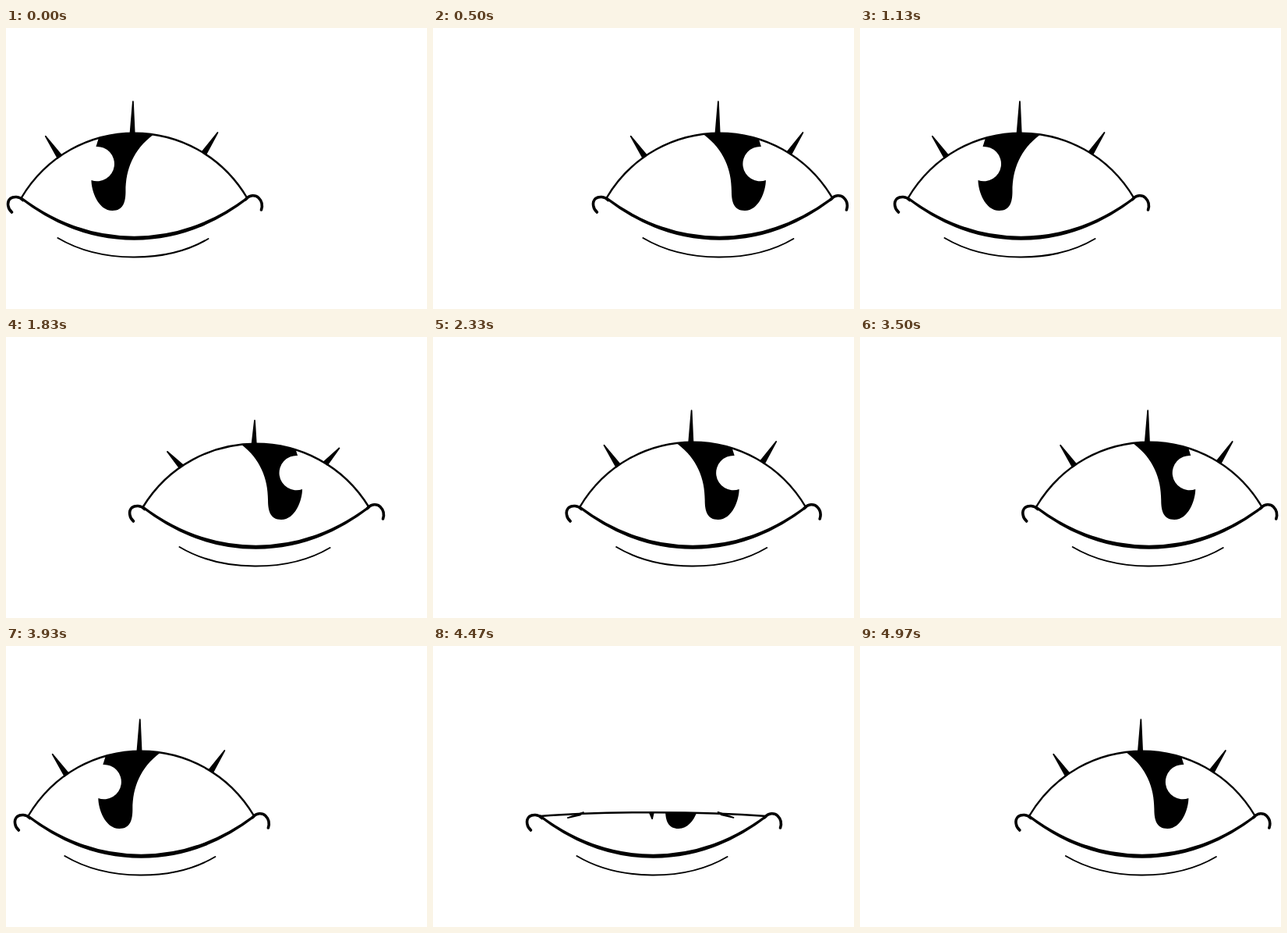
An HTML page that plays this animation: 540x360 px, repeating every 5000 ms.

```html
<!DOCTYPE html>
<html lang="en">
<head>
<meta charset="utf-8">
<title>Glancing eye</title>
<style>
  html, body { margin: 0; width: 100%; height: 100%; overflow: hidden; background: #fff; }
  svg { display: block; width: 540px; height: 360px; }
  .line { fill: none; stroke: #000; stroke-linecap: round; stroke-linejoin: round; }
</style>
</head>
<body>
<svg viewBox="0 0 540 360">
  <defs>
    <clipPath id="opening"><path id="hole"/></clipPath>
  </defs>
  <g id="eye">
    <g clip-path="url(#opening)">
      <path id="pupil" d="M119 138 L115 151 A22.15 22.15 0 1 1 109 194
        C109 208 118 233 136 233 C150 233 153 222 153 208
        C153 180 163 155 188 136 L188 125 L119 125 Z"/>
    </g>
    <path id="lid" class="line" stroke-width="2.4"/>
    <path id="lashes" stroke="#000" stroke-width="1.8" stroke-linejoin="round"/>
    <path d="M19 217 C109 284 219 284 309 217 C219 286.5 109 286.5 19 217 Z"
      stroke="#000" stroke-width="3.2" stroke-linejoin="round"/>
    <path class="line" stroke-width="3.6" d="M21 219.5 C17 214.5 9 214.5 5 217.5 C0 222 2 231 7 235"/>
    <path class="line" stroke-width="3.6" d="M307 218.5 C312 212.5 319.5 212.5 323.5 216.5 C327.5 220.5 329 226 327 232"/>
    <path class="line" stroke-width="2" d="M66 268 C120 300 205 301 259 269"/>
  </g>
</svg>
<script>
const LOOP = 5000;
const TRAVEL = 210.4;
// Glance starts; even entries go right, odd ones go left.
const STARTS = [-6, 741, 1450, 2168, 2734, 3451, 4160, 4882];
const DURATIONS = [575, 552];
const BLINK = 0.195;   // half width of the blink, as a share of a glance

const LEFT = 19, RIGHT = 309, CORNER = 217;
const INSET_X = 0.4, INSET_Y = 1;
// Place along the lid, tip offset, half base
const LASHES = [
  { at: 0.2, tip: [-17.8, -26], base: [2.3, -1.8] },
  { at: 0.493, tip: [0.8, -40.5], base: [2.6, 0] },
  { at: 0.778, tip: [17.5, -26.5], base: [2.3, 1.8] }
];

const $ = id => document.getElementById(id);
const eye = $('eye'), pupil = $('pupil'), lid = $('lid'), hole = $('hole'), lashes = $('lashes');
const mix = (a, b, k) => a + (b - a) * k;
const cubic = (a, b, c, d, t) => {
  const s = 1 - t;
  return a * s * s * s + 3 * b * s * s * t + 3 * c * s * t * t + d * t * t * t;
};

function pose(t) {
  let i = STARTS.length - 1;
  while (i > 0 && t < STARTS[i]) i--;
  const p = Math.max(0, Math.min(1, (t - STARTS[i]) / DURATIONS[i % 2]));
  const ease = (1 - Math.cos(Math.PI * p)) / 2;
  const leftward = i % 2 === 1;
  return {
    x: TRAVEL * (leftward ? 1 - ease : ease),
    lookRight: (p >= 0.5) !== leftward,
    shut: Math.max(0, 1 - Math.abs(p - 0.5) / BLINK)
  };
}

function draw(t) {
  const { x, lookRight, shut } = pose(t);
  const drop = Math.pow(shut, 2.4);
  const pull = mix(66, 90, drop);
  const y = mix(106, 285, drop);
  const x1 = LEFT + pull, x2 = RIGHT - pull;
  const arc = `M${LEFT} ${CORNER} C${x1} ${y} ${x2} ${y} ${RIGHT} ${CORNER}`;
  const lashY = 1 - 1.5 * shut;

  eye.setAttribute('transform', `translate(${(x + INSET_X).toFixed(2)} ${INSET_Y})`);
  pupil.setAttribute('transform', lookRight ? 'translate(332.5 0) scale(-1 1)' : '');
  lid.setAttribute('d', arc);
  hole.setAttribute('d', arc + ' C219 285 109 285 19 217 Z');
  lashes.setAttribute('d', LASHES.map(({ at, tip, base }) => {
    const bx = cubic(LEFT, x1, x2, RIGHT, at);
    const by = cubic(CORNER, y, y, CORNER, at);
    return `M${bx - base[0]} ${by - base[1]} L${bx + tip[0]} ${by + tip[1] * lashY} ` +
      `L${bx + base[0]} ${by + base[1]} Z`;
  }).join(' '));
}

// Thirty pictures a second, on a 10 ms grid
const snap = t => Math.round(Math.floor((t + 3.4) * 0.03) * 10 / 3) * 10;

const begin = performance.now();
function tick() {
  draw(snap((performance.now() - begin) % LOOP) % LOOP);
  requestAnimationFrame(tick);
}
tick();
</script>
</body>
</html>
```
